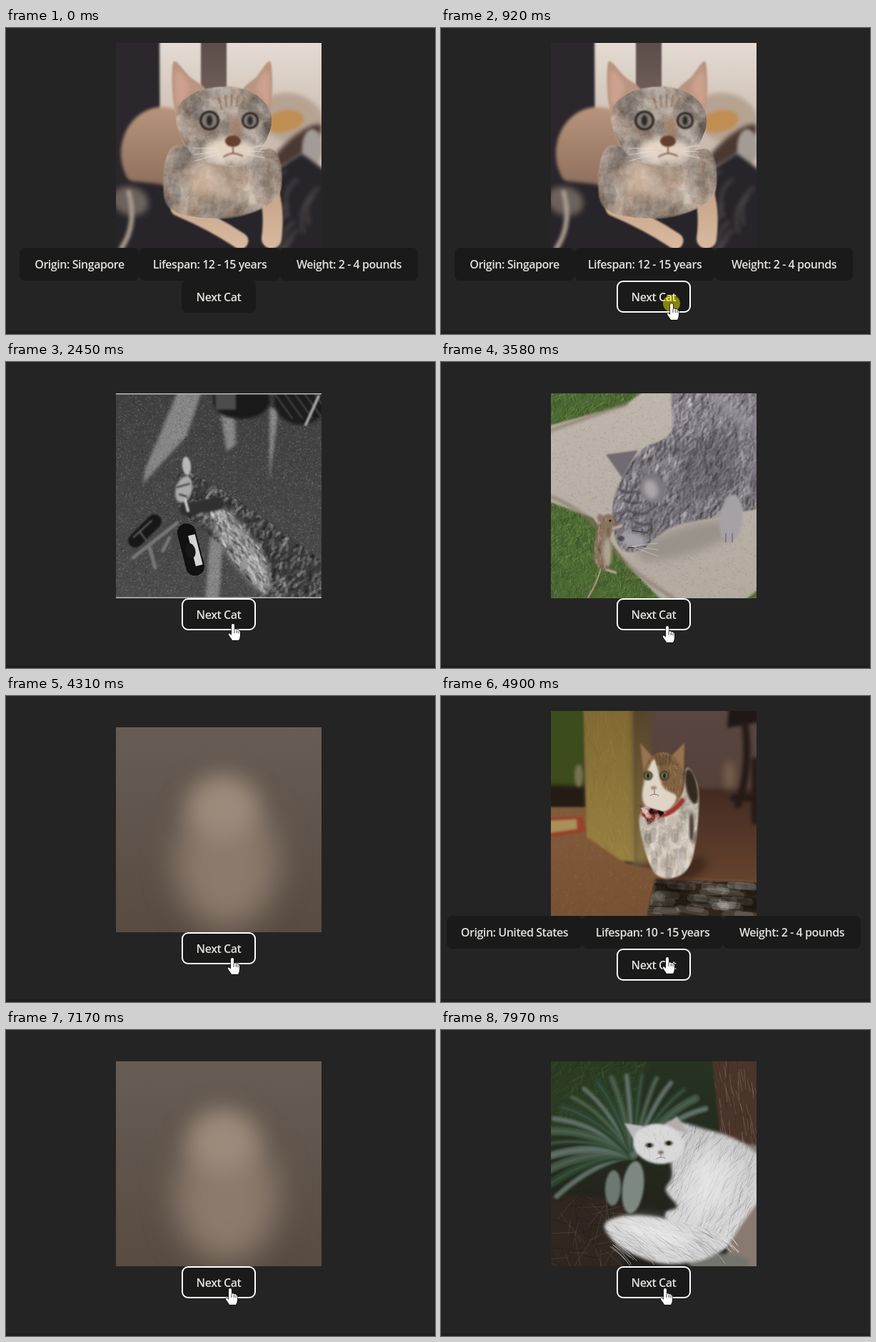
An HTML page with a canvas for the animation above (8 s loop, 601 by 430 pixels).

```html
<!DOCTYPE html>
<html lang="en">
<head>
<meta charset="utf-8">
<title>Cat browser</title>
<style>
html, body { margin: 0; width: 100%; height: 100%; overflow: hidden; background: #242424; }
canvas { display: block; }
</style>
</head>
<body>
<canvas id="stage" width="601" height="430"></canvas>
<script>
const ctx = document.getElementById('stage').getContext('2d');
const LOOP = 8000, SIZE = 288;
let g, seed;

const rand = (a = 0, b = 1) => {
  seed = (seed * 16807) % 2147483647;
  return a + (b - a) * seed / 2147483647;
};

// Points on the rim continue past it, so blurred edges stay solid
const bleed = v => v <= 0 ? -20 : v >= SIZE ? SIZE + 20 : v;
const points = text => text.split(' ').map(p => p.split(',').map(v => bleed(+v)));

function paint(path, color, blur) {
  g.filter = `blur(${blur}px)`;
  g.fillStyle = color;
  g.fill(path);
  g.filter = 'none';
  return path;
}

function poly(color, blur, text) {
  const path = new Path2D();
  points(text).forEach(p => path.lineTo(...p));
  return paint(path, color, blur);
}

// Smooth closed outline through the points
function blob(color, blur, text) {
  const p = points(text), n = p.length, path = new Path2D();
  path.moveTo(...p[0]);
  for (let i = 0; i < n; i++) {
    const [a, b, c, d] = [n - 1, 0, 1, 2].map(k => p[(i + k) % n]);
    path.bezierCurveTo(b[0] + (c[0] - a[0]) / 6, b[1] + (c[1] - a[1]) / 6,
      c[0] - (d[0] - b[0]) / 6, c[1] - (d[1] - b[1]) / 6, ...c);
  }
  return paint(path, color, blur);
}

function oval(color, blur, x, y, rx, ry = rx, turn = 0) {
  const path = new Path2D();
  path.ellipse(x, y, rx, ry, turn, 0, 7);
  return paint(path, color, blur);
}

function line(color, width, blur, d) {
  g.filter = `blur(${blur}px)`;
  g.strokeStyle = color;
  g.lineWidth = width;
  g.lineCap = 'round';
  g.stroke(new Path2D(d));
  g.filter = 'none';
}

function fade(top, bottom, y0 = 0, y1 = SIZE) {
  const grad = g.createLinearGradient(0, y0, 0, y1);
  grad.addColorStop(0, top);
  grad.addColorStop(1, bottom);
  return grad;
}

function backdrop(color) {
  g.fillStyle = color;
  g.fillRect(0, 0, SIZE, SIZE);
}

// Random light and dark strokes inside a shape
function texture(path, count, len, angle, spread, alpha, light = '#fff', dark = '#000') {
  g.save();
  g.clip(path);
  g.globalAlpha = alpha;
  for (let i = 0; i < count; i++) {
    const x = rand(-9, SIZE), y = rand(-9, SIZE);
    const a = angle + rand(-spread, spread), l = len * rand(0.5, 1.5);
    g.strokeStyle = i % 2 ? light : dark;
    g.beginPath();
    g.moveTo(x, y);
    g.lineTo(x + Math.cos(a) * l, y + Math.sin(a) * l);
    g.stroke();
  }
  g.restore();
}

function eye(x, y, r, iris) {
  oval('#30251f', 0.9, x, y, r);
  oval(iris, 0.8, x, y, r * 0.76);
  oval('#2b2725', r * 0.12, x, y, r * 0.3, r * 0.55);
}

function tanCat() {
  backdrop(fade('#e5dbd2', '#c9bbb0', 0, 130));
  poly('#2c272c', 1.5, '0,0 61,0 62,200 0,200');
  poly(fade('#5b4d49', '#75645c', 0, 90), 1.2, '119,0 155,0 155,100 119,100');
  oval('#b6a392', 3, 245, 105, 46, 34, 0.25);
  oval('#c08d52', 2, 236, 110, 27, 15, -0.2);
  oval('#4a3933', 3, 253, 145, 45, 13, -0.7);
  oval('#a39b96', 2, 275, 147, 14, 26);
  oval(fade('#b8957b', '#8f705f', 90, 200), 2, 65, 155, 58, 65);
  poly('#28252a', 2.5, '0,190 60,198 140,220 230,175 260,155 288,190 288,288 0,288');
  for (let i = 0; i < 9; i++) {
    const x = 235 + rand(0, 50), y = 180 + i * 12;
    line('#4d4748', 4, 3, `M${x} ${y}q-22 14 -14 50`);
  }
  oval('#6d625c', 4, 20, 222, 26, 20, 0.3);
  line('#a6988b', 7, 2, 'M8 288Q30 255 18 210');
  const limb = fade('#c9a88d', '#d9baa0', 225, 288);
  line(limb, 23, 0.8, 'M88 232Q135 252 174 278');
  line(limb, 28, 0.8, 'M213 205Q223 235 218 275');
  const body = blob(fade('#b9967b', '#d3b195', 145, 240), 1.2,
    '82,145 160,165 220,150 231,205 205,232 150,246 85,238 67,205');
  texture(body, 1800, 8, 1.6, 0.3, 0.05);
  oval('rgba(226,199,174,.55)', 9, 135, 193, 42, 30);
  for (const [tip, inner, outer] of [[80, 126, 86], [217, 178, 214]]) {
    blob('#b99580', 0.9, `${tip},28 ${(tip + inner) / 2},47 ${inner},70 ${outer},100`);
    blob('#cea18e', 3, `${tip + (inner - tip) * 0.1},40 ${(tip + inner) / 2},62 ${outer},88`);
  }
  const head = blob(fade('#bc9c82', '#dbc0a9', 62, 172), 1,
    '84,102 110,70 165,62 205,80 218,115 192,163 158,172 108,157');
  texture(head, 1800, 6, 1.3, 0.6, 0.06);
  oval('rgba(236,219,203,.85)', 5, 160, 151, 37, 17);
  oval('rgba(154,109,79,.65)', 5, 168, 119, 9, 19);
  for (let i = -2; i <= 2; i++) line('#916c50', 2, 1.2, `M${162 + i * 9} ${73 + i * i}l${-i * 2} 15`);
  oval('rgba(130,92,72,.5)', 4, 128, 124, 18, 6, 0.3);
  eye(131, 109, 14, '#827b78');
  eye(188, 109, 12, '#827b78');
  oval('#65402f', 1, 164, 138, 11, 8);
  line('#654535', 1.6, 0.8, 'M164 146V154M151 160Q164 151 177 159');
  for (let i = 0; i < 3; i++) line('#efe1d2', 0.7, 0.4, `M144 ${148 + i * 4}l-34 ${i * 5}M185 ${148 + i * 4}l23 ${i * 5 - 4}`);
}

function partyCat() {
  backdrop(fade('#404040', '#4b4b4b'));
  const beams = ['94,0 126,0 99,60 38,127 41,106', '147,30 167,34 168,72 155,82',
    '215,20 228,22 215,125', '132,200 151,190 143,288 124,288'];
  for (const b of beams) poly('#858585', 2, b);
  const floor = new Path2D('M0 0H288V288H0Z');
  texture(floor, 14000, 2, 0, 4, 0.12);
  oval('#191919', 2, 176, 10, 40, 26);
  poly('#4c4c4c', 1.5, '138,0 168,0 168,23 140,23');
  oval('#1c1c1c', 2, 259, 10, 38, 34);
  for (let i = 0; i < 5; i++) line('#494949', 2, 1, `M${222 + i * 14} 0l25 35`);
  line('#aaa', 4, 1, 'M284 4L266 44');
  const cat = blob('#404040', 1.2, '90,112 125,122 205,174 288,256 288,288 208,288 192,255 118,188 86,155');
  texture(cat, 3000, 7, 2.1, 0.7, 0.15);
  for (let i = 0; i < 10; i++) line('#272727', 3, 2, `M${146 + i * 14} ${142 + i * 12}q-4 12 -13 26`);
  const belly = blob('#989898', 4, '132,170 155,165 200,217 213,250 208,282 160,230');
  texture(belly, 3500, 9, 1, 0.5, 0.18);
  oval('#aaa', 1.5, 95, 135, 11, 19, 0.3);
  oval('#b8b8b8', 1, 99, 102, 6, 13, -0.1);
  line('#333', 2, 0.8, 'M86 132l17 -5M89 142l10 3M103 116l12 12');
  line('#303030', 18, 1.5, 'M98 163L143 155');
  line('#ccc', 4, 0.8, 'M97 150l4 15');
  line('#777', 5, 1, 'M24 231L86 182M47 216l8 29M75 203l-9 18');
  line('#171717', 20, 0.8, 'M27 207L54 180');
  line('#686868', 2, 1, 'M25 202L50 179M33 194l9 12');
  g.save();
  g.translate(105, 220);
  g.rotate(-0.25);
  line('#111', 26, 0.5, 'M0 -25V24');
  poly('#d5d5d5', 0.5, '-12,-16 11,-16 11,24 -12,24'.replaceAll('-12', '1'));
  oval('#181818', 0.7, -1, 1, 7, 11);
  g.restore();
  g.fillStyle = '#bbb';
  for (const y of [0, 286.5]) g.fillRect(0, y, SIZE, 1.5);
}

function greyCat() {
  backdrop(fade('#beb6ac', '#b3aaa0'));
  texture(new Path2D('M0 0H288V288H0Z'), 5000, 3, 0, 4, 0.07);
  for (const shape of ['0,0 150,0 105,16 0,50', '0,146 58,175 110,245 172,288 0,288', '250,288 288,262 288,288']) {
    const lawn = poly('#4c6833', 1.5, shape);
    texture(lawn, 5000, 8, -1.2, 1, 0.45, '#759b4c', '#343e27');
  }
  line('#83745f', 3, 2, 'M0 52L106 15M0 145Q55 168 78 206T172 288');
  oval('#99928b', 6, 190, 207, 72, 19, -0.3);
  const cat = blob(fade('#858088', '#6f6972'), 1.2,
    '168,54 180,0 288,0 288,140 245,170 172,187 120,222 92,208 89,145 125,82');
  texture(cat, 5000, 10, 2, 0.6, 0.11);
  for (let i = 0; i < 7; i++) line('rgba(57,52,60,.38)', 8, 5, `M${184 + i * 12} ${72 - i * 4}q8 32 -4 85`);
  line('#99949b', 10, 6, 'M232 0Q250 34 288 42');
  oval('#a5a1a4', 1.5, 252, 176, 16, 34, 0.12);
  for (const x of [245, 254]) line('#6c6770', 1.3, 0.7, `M${x} 197v12`);
  poly('#716a72', 1, '77,86 122,80 100,119');
  oval('#7d777f', 1.3, 142, 134, 17, 21, -0.3);
  oval('#aca5a9', 3, 140, 135, 10, 14, -0.3);
  for (let i = 0; i < 4; i++) line('#48424c', 3, 1.5, `M${95 + i * 7} ${135 + i * 15}q13 7 25 3`);
  oval('#a5a0a5', 3, 114, 206, 20, 11, 0.2);
  oval('#4a434a', 1, 98, 204, 5, 4);
  line('#45404a', 1.7, 0.7, 'M114 193l21 3M108 217l25 -1');
  for (let i = 0; i < 3; i++) line('#cfcaca', 0.7, 0.5, `M114 215q20 ${i * 6 - 4} 36 ${i * 9 - 4}`);
  line('#a99085', 2.2, 0.7, 'M70 245Q66 264 52 287');
  const mouse = blob('#89735d', 1, '69,176 83,170 92,181 83,203 80,247 61,236 64,194');
  texture(mouse, 2500, 5, 1.5, 0.3, 0.12);
  oval('#b0a293', 2, 79, 223, 6, 20);
  oval('#8f7370', 0.8, 69, 175, 4, 5);
  oval('#181414', 0.4, 83, 179, 1.6);
  line('#c8b0a6', 3, 0.8, 'M87 190l12 -4M78 248l13 4');
}

function calicoCat() {
  backdrop(fade('#594640', '#4d3931'));
  poly('#3d4c1d', 1.5, '0,0 47,0 47,108 0,106');
  poly('#241b15', 3, '0,103 48,106 48,148 0,150');
  oval('#777352', 2, 39, 91, 6, 16);
  poly(fade('#432b22', '#65432d', 110, 240), 2.5, '136,108 288,110 288,250 130,238');
  const floor = poly(fade('#805a39', '#785133', 150, 288), 1.5, '0,135 50,135 105,214 195,235 288,240 288,288 0,288');
  texture(floor, 2000, 4, 0, 3, 0.05);
  poly('#98422a', 1.2, '0,151 44,148 50,169 0,181');
  poly('#a98f59', 1.5, '0,155 36,152 37,166 0,174');
  const pillar = poly(fade('#806a31', '#978041', 0, 210), 1.5, '45,0 116,0 118,212 98,210 50,177');
  texture(pillar, 900, 14, 1.4, 0.6, 0.05);
  poly(fade('#56442a', '#84703f', 0, 205), 4, '114,0 140,0 137,214 116,215');
  poly('#201816', 2, '250,0 288,0 288,13 247,24');
  line('#251a17', 10, 2.5, 'M272 18Q280 82 262 132M286 70V155M256 122H288');
  oval('#806751', 6, 250, 90, 6, 21);
  const mat = poly('#302519', 1.5, '146,236 288,242 288,288 131,288');
  texture(mat, 1000, 25, 0.08, 0.1, 0.12);
  oval('#41291d', 6, 190, 223, 31, 14, -0.4);
  const body = blob(fade('#cec2b3', '#d9cdbf', 130, 230), 1.2, '128,140 180,120 191,80 207,115 200,200 181,231 148,230 129,185');
  texture(body, 2200, 9, 1.5, 0.3, 0.07);
  oval('#34291f', 1.8, 197, 106, 8, 25, -0.2);
  oval('#4c3d30', 1.5, 197, 163, 3, 19);
  line('#a08f7d', 1.5, 1, 'M163 199V225M146 224v5M177 224v5');
  for (const [a, b, c] of [[125, 142, 130], [187, 168, 186]])
    poly('#987251', 1, `${a},45 ${b},64 ${c},88`);
  const head = oval('#826341', 1, 157, 99, 29, 41);
  texture(head, 1800, 6, 1.4, 0.3, 0.13);
  blob('#dfd5c7', 1.5, '144,68 157,106 176,121 160,143 136,138 128,114');
  for (let i = 0; i < 5; i++) line('#463425', 1.6, 0.9, `M${147 + i * 5} 62l${2 - i} 14`);
  eye(136, 91, 6.5, '#6f7850');
  eye(159, 91, 6.5, '#6f7850');
  oval('#aa8476', 0.8, 144, 108, 4, 2.6);
  line('#84705f', 1, 0.6, 'M145 111v5M139 119q6 -4 12 0');
  line('#9f342d', 7, 1, 'M130 145Q164 154 184 126');
  const scarf = poly('#a04236', 1, '124,132 162,143 136,160');
  texture(scarf, 4000, 2, 0, 3, 0.35);
}

function whiteCat() {
  backdrop(fade('#263321', '#211d1a'));
  const grass = poly('#2b3c22', 5, '0,0 140,0 110,90 0,110');
  texture(grass, 1500, 15, -1, 1, 0.25, '#557446', '#192315');
  const twigs = poly('#302721', 3, '0,185 110,195 100,288 0,288');
  texture(twigs, 500, 35, 0.9, 1.4, 0.35, '#735e50', '#171411');
  // Long leaves fan out from one root
  for (let i = 0; i < 19; i++) {
    const a = 2.6 + i * 0.17, x = 115 + Math.cos(a) * 125, y = 132 + Math.sin(a) * 112;
    const mx = (x + 115) / 2, my = (y + 132) / 2 - 20;
    const d = `M115 132Q${mx} ${my} ${x} ${y}`;
    line(['#586960', '#2c4430', '#415643'][i % 3], rand(6, 12), 1.5, d);
    line('rgba(137,151,139,.5)', 1, 0.8, d);
  }
  oval('#7d8881', 1.5, 115, 177, 15, 37, 0.12);
  oval('#6c7971', 1.5, 87, 178, 11, 25, 0.05);
  const bark = poly('#4b352b', 1.5, '224,0 288,0 288,125 238,112');
  texture(bark, 1000, 22, 1.45, 0.2, 0.15);
  poly('#887971', 2, '265,115 288,120 288,288 242,288');
  oval('#74746f', 2, 235, 283, 43, 13);
  const back = fade('#c4c4c5', '#dadadb', 75, 270);
  const body = blob(back, 2, '160,88 215,95 270,116 288,160 270,225 235,266 183,258 160,216 177,204 161,181 170,157');
  texture(body, 3500, 19, 2.1, 0.4, 0.12);
  oval('rgba(240,240,241,.6)', 14, 222, 168, 33, 48, 0.3);
  const tail = blob('#d4d3d4', 2, '75,231 105,217 165,222 247,249 218,277 155,284 100,262');
  texture(tail, 3500, 20, 0.5, 0.4, 0.12);
  oval('rgba(240,239,239,.7)', 9, 150, 243, 52, 18, 0.25);
  for (let i = 0; i < 70; i++) {
    const x = rand(80, 245), y = 250 + rand(-18, 12);
    line(i % 3 ? '#dcdcdc' : '#b1b1b3', 0.8, 0.4, `M${x} ${y}q14 10 25 ${rand(16, 27)}`);
  }
  poly('#bfbaba', 1.2, '103,87 130,91 117,112');
  poly('#b2adae', 1.5, '158,93 176,77 193,101');
  const face = oval('#d8d8d8', 1.5, 151, 116, 36, 28, 0.15);
  texture(face, 1600, 7, 1.2, 0.8, 0.09);
  for (const x of [138, 165]) {
    oval('#5f5d51', 0.8, x, 118 - (x - 138) / 9, 6, 3.5);
    oval('#252422', 0.6, x, 118 - (x - 138) / 9, 2.7);
  }
  oval('#856f6b', 0.9, 154, 128, 4, 2.5);
  line('#8c8585', 1, 0.7, 'M154 131v4M148 137q6 -4 12 -1');
}

// A barely resolved picture between two loads
function softCat() {
  backdrop(fade('#685d54', '#574b42'));
  oval('#8b7b6c', 22, 155, 190, 72, 92);
  oval('#9b8b7b', 16, 150, 112, 49, 45);
}

const photos = [tanCat, partyCat, greyCat, calicoCat, whiteCat, softCat].map((draw, i) => {
  const c = document.createElement('canvas');
  c.width = c.height = SIZE;
  g = c.getContext('2d');
  seed = 4321 + i * 977;
  draw();
  return c;
});

const [TAN, PARTY, GREY, CALICO, WHITE, SOFT] = photos;
// Start time, photo, info row
const scenes = [
  [0, TAN, 'Singapore', 12], [1320, TAN], [1460, PARTY], [2780, GREY], [3910, SOFT],
  [4900, CALICO, 'United States', 10], [6500, CALICO], [6630, SOFT], [7430, WHITE]
];
// First step, last step, step count, goal
const moves = [
  [120, 660, 9, 323, 387], [2050, 2190, 3, 318, 368], [2980, 2980, 1, 317, 371],
  [4310, 4380, 2, 317, 367], [5300, 5370, 2, 317, 380], [6770, 6960, 4, 314, 363]
];
const clicks = [[920, 1050], [2320, 2450], [3450, 3580], [4510, 4640], [6170, 6230], [7030, 7170], [7830, 7970]];

const ARROW = new Path2D('M0 0V16L3.7 12.5L6.4 18.5L8.7 17.5L6.1 11.6H11Z');
const HAND = new Path2D('M-2 14V2Q-2 0 0 0Q2 0 2 2V8Q4 6.5 5.5 8.5Q7.5 7.5 8.5 9.5Q10 9 10 12V16Q10 20 8 23H-1Q-2 21 -5 17Q-7 14.5 -5.5 13.5Q-4 13 -2 16Z');

function pointer(t) {
  let x = 482, y = 440;
  for (const [a, b, n, gx, gy] of moves) {
    if (t < a) break;
    const step = a === b ? n : Math.min(n, 1 + Math.floor((t - a) / (b - a) * (n - 1)));
    const p = step / n, e = p * (2 - p);
    x += (gx - x) * e;
    y += (gy - y) * e;
  }
  return [Math.round(x), Math.round(y)];
}

function button(x, y, w, h, label, ring, weight = 0) {
  ctx.fillStyle = '#1a1a1a';
  ctx.beginPath();
  ctx.roundRect(x, y, w, h, 8);
  ctx.fill();
  if (ring) {
    ctx.strokeStyle = ring;
    ctx.lineWidth = weight;
    ctx.beginPath();
    ctx.roundRect(x + weight / 2, y + weight / 2, w - weight, h - weight, 8);
    ctx.stroke();
  }
  ctx.fillStyle = '#e4e1dd';
  ctx.fillText(label, x + w / 2, y + 28.5);
}

function draw(t) {
  const [, photo, origin, years] = scenes.filter(s => s[0] <= t).pop();
  const top = origin ? 21 : 44, btnY = top + (origin ? 334 : 288);
  const [x, y] = pointer(t);
  const hover = x > 246 && x < 350 && y > btnY && y < btnY + 45;
  const focus = t >= 920;

  ctx.fillStyle = '#242424';
  ctx.fillRect(0, 0, 601, 430);
  ctx.fillStyle = '#201f20';
  ctx.fillRect(0, 426, 601, 4);
  ctx.drawImage(photo, 154, top);

  ctx.font = '600 16px "Open Sans", "Noto Sans", sans-serif';
  ctx.letterSpacing = '-0.45px';
  ctx.textAlign = 'center';
  if (origin) {
    const wide = origin.length > 9, left = wide ? 8 : 19, first = wide ? 190 : 168;
    button(left, 309, first, 46, 'Origin: ' + origin);
    button(left + first, 309, 197, 46, `Lifespan: ${years} - 15 years`);
    button(left + first + 197, 309, 193, 46, 'Weight: 2 - 4 pounds');
  }
  button(246, btnY, 104, 45, 'Next Cat', focus ? '#fff' : hover && '#646cff', focus ? 2 : 1);

  if (t < 120) return;
  if (clicks.some(([a, b]) => t >= a && t < b)) {
    ctx.fillStyle = 'rgba(255,255,0,.47)';
    ctx.beginPath();
    ctx.arc(x, y, 12, 0, 7);
    ctx.fill();
  }
  ctx.save();
  ctx.translate(x, y);
  const shape = hover ? HAND : ARROW;
  ctx.lineJoin = 'round';
  ctx.lineWidth = 1.4;
  ctx.strokeStyle = '#111';
  ctx.stroke(shape);
  ctx.fillStyle = '#fff';
  ctx.fill(shape);
  if (hover) {
    ctx.lineWidth = 0.8;
    ctx.stroke(new Path2D('M2 8V13M5.3 9V13M8 10V13.5'));
  }
  ctx.restore();
}

const start = performance.now();
function frame() {
  draw((performance.now() - start) % LOOP);
  requestAnimationFrame(frame);
}
frame();
</script>
</body>
</html>
```
